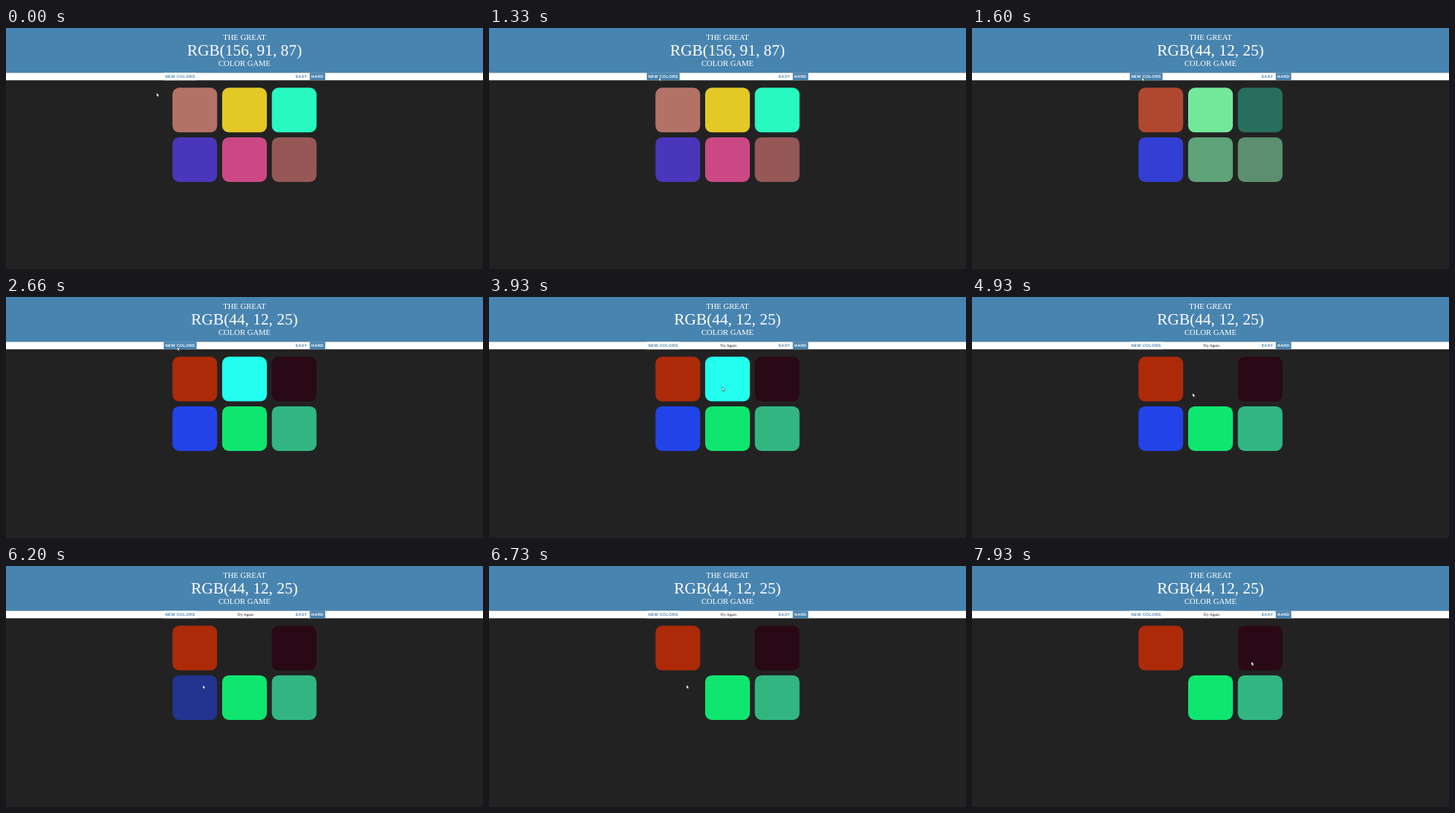
Animation, 640 px wide and 324 px high, one loop 8000 ms. Source, as an HTML page:

```html
<!DOCTYPE html>
<html lang="en">
<head>
<meta charset="utf-8">
<title>Color Game</title>
<style>
  html, body { margin: 0; height: 100%; overflow: hidden; background: #222; }
  svg { display: block; width: 100vw; height: 100vh; }
  text { text-rendering: geometricPrecision; white-space: pre; }
  .title { font: 10.667px "Liberation Serif", Times, serif; fill: #fff; text-anchor: middle; }
  .title .big { font-size: 21.333px; }
  .btn { font: bold 5.333px "Liberation Sans", Arial, sans-serif; letter-spacing: .333px; }
  #message { font: 5.333px "Liberation Serif", Times, serif; text-anchor: middle; }
</style>
</head>
<body>
<svg viewBox="0 0 640 324">
  <rect width="640" height="324" fill="#222"/>
  <rect width="640" height="60.27" fill="#4884b0"/>
  <g class="title">
    <text x="320" y="16.13">THE GREAT</text>
    <text x="320" y="37.33" class="big" id="goal"></text>
    <text x="320" y="51.33">COLOR GAME</text>
  </g>
  <rect y="60.27" width="640" height="10" fill="#fff"/>
  <rect id="newBox" x="211.68" y="60.27" width="44.07" height="10"/>
  <rect x="407.59" y="60.27" width="20.73" height="10" fill="#4884b0"/>
  <g class="btn">
    <text id="newText" x="213.68" y="67.1">NEW COLORS</text>
    <text x="388.41" y="67.1" fill="#4884b0">EASY</text>
    <text x="409.59" y="67.1" fill="#fff">HARD</text>
  </g>
  <text id="message" x="321.08" y="67.1">Try Again</text>
  <g id="squares"></g>
  <path id="cursor" d="M0 0V5.2L1.2 4.2L2 6L3 5.6L2.2 3.8H3.8Z"
        fill="#fff" stroke="#111" stroke-width=".45"/>
</svg>
<script>
const LOOP = 8000, FADE = 600;
const BLUE = [72, 132, 176], WHITE = [255, 255, 255], DARK = [34, 34, 34];
const HOVER_IN = 210, NEW_CLICK = 1400, HOVER_OUT = 2720, FIRST_MISS = 3930, SECOND_MISS = 6040;

const before = [[179, 114, 101], [228, 200, 38], [39, 249, 193], [74, 54, 187], [203, 72, 133], [150, 87, 87]];
const after = [[173, 42, 8], [34, 255, 238], [40, 9, 21], [34, 67, 232], [14, 230, 112], [49, 182, 130]];
const missed = { 1: FIRST_MISS, 3: SECOND_MISS };

// Start time, end time, then start, control and end points
const moves = [
  [50, 330, 202, 87, 216, 75, 228, 66],
  [2580, 3660, 228.5, 66, 268, 92, 313, 121],
  [4560, 5400, 313, 121, 295, 124, 264, 160],
  [6660, 7960, 264, 160, 318, 146, 375, 128.5]
];

const $ = id => document.getElementById(id);
const clamp = v => Math.min(1, Math.max(0, v));
const bezier = (a, b, u) => 3 * a * u * (1 - u) ** 2 + 3 * b * u * u * (1 - u) + u ** 3;

// Same curve as the CSS "ease" timing function
function ease(x) {
  let lo = 0, hi = 1;
  for (let i = 0; i < 20; i++) {
    const mid = (lo + hi) / 2;
    if (bezier(.25, .25, mid) < x) lo = mid; else hi = mid;
  }
  return bezier(.1, 1, lo);
}

const fade = (t, start) => t <= start ? 0 : t >= start + FADE ? 1 : ease((t - start) / FADE);
const mix = (a, b, k) => a.map((v, i) => v + (b[i] - v) * k);
const paint = (el, c) => el.setAttribute("fill", `rgb(${c.map(Math.round)})`);

const squares = before.map((_, i) => {
  const el = document.createElementNS("http://www.w3.org/2000/svg", "rect");
  const box = { x: 223.33 + i % 3 * 66.67, y: 80.27 + (i > 2) * 66.67, width: 60, height: 60, rx: 9 };
  for (const key in box) el.setAttribute(key, box[key]);
  return $("squares").appendChild(el);
});

function cursorAt(t) {
  const [t0, t1, x0, y0, cx, cy, x1, y1] = moves.filter(m => m[0] <= t).pop() || moves[0];
  const p = clamp((t - t0) / (t1 - t0)), u = p * p * (3 - 2 * p);
  const curve = (a, c, b) => a * (1 - u) ** 2 + 2 * c * u * (1 - u) + b * u * u;
  return [curve(x0, cx, x1), curve(y0, cy, y1)];
}

function draw(t) {
  $("goal").textContent = t < NEW_CLICK - 10 ? "RGB(156, 91, 87)" : "RGB(44, 12, 25)";
  $("message").style.display = t < FIRST_MISS ? "none" : "";

  const hover = fade(t, HOVER_IN) - fade(t, HOVER_OUT);
  paint($("newBox"), mix(WHITE, BLUE, hover));
  paint($("newText"), mix(BLUE, WHITE, hover));

  const change = fade(t, NEW_CLICK);
  squares.forEach((el, i) => {
    const color = mix(before[i], after[i], change);
    paint(el, i in missed ? mix(color, DARK, fade(t, missed[i])) : color);
  });

  $("cursor").setAttribute("transform", `translate(${cursorAt(t)})`);
}

const start = performance.now();
function tick() {
  draw((performance.now() - start) % LOOP);
  requestAnimationFrame(tick);
}
tick();
</script>
</body>
</html>
```
